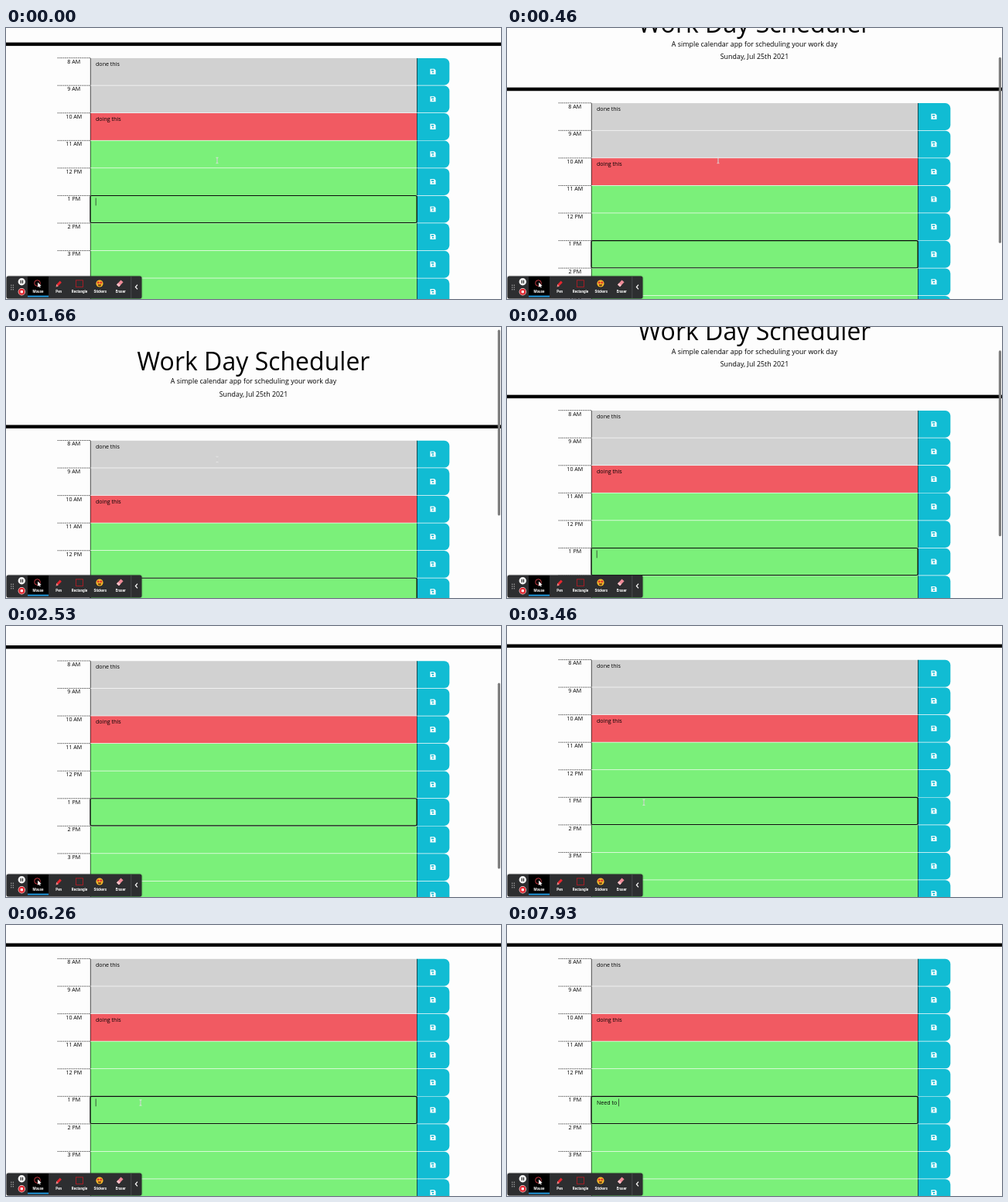
Animation, 640 px wide and 350 px high, one loop 8 s. Source, as an HTML page with a canvas:

```html
<!DOCTYPE html>
<html lang="en">
<head>
<meta charset="utf-8">
<title>Work Day Scheduler</title>
<style>
  html, body { margin: 0; width: 100%; height: 100%; overflow: hidden; background: #fdfdfd; }
  canvas { display: block; width: 640px; height: 350px; }
</style>
</head>
<body>
<canvas id="stage" width="640" height="350"></canvas>
<script>
const ctx = document.getElementById('stage').getContext('2d');
const LOOP = 8000;
const SCALE = 4 / 9;          // page is laid out 1440 px wide
const ROW_TOP = 337, ROW_H = 80, FOCUS = 5;
const LEFT = 150, CELL = 245, SAVE = 1195, RIGHT = 1290;
const HOURS = ['8 AM', '9 AM', '10 AM', '11 AM', '12 PM', '1 PM', '2 PM', '3 PM', '4 PM', '5 PM'];
const NOTES = { 0: 'done this', 2: 'doing this' };
const TYPED = 'Need to ';
const KEYS = [6800, 7000, 7130, 7270, 7400, 7730, 7800, 7930];
const SANS = '"Open Sans", sans-serif';

const clamp = x => Math.min(1, Math.max(0, x));
const span = (t, a, b) => clamp((t - a) / (b - a));
const smooth = x => x * x * (3 - 2 * x);
const mix = (a, b, k) => a + (b - a) * k;

function rect(x, y, w, h, color) {
  ctx.fillStyle = color;
  ctx.fillRect(x, y, w, h);
}

function round(x, y, w, h, r, color) {
  ctx.fillStyle = color;
  ctx.beginPath();
  ctx.roundRect(x, y, w, h, r);
  ctx.fill();
}

function disc(x, y, r, color) {
  ctx.fillStyle = color;
  ctx.beginPath();
  ctx.arc(x, y, r, 0, Math.PI * 2);
  ctx.fill();
}

function poly(points, color) {
  ctx.fillStyle = color;
  ctx.beginPath();
  points.forEach(([x, y]) => ctx.lineTo(x, y));
  ctx.closePath();
  ctx.fill();
}

function line(points, color, width) {
  ctx.strokeStyle = color;
  ctx.lineWidth = width;
  ctx.beginPath();
  points.forEach(([x, y]) => ctx.lineTo(x, y));
  ctx.stroke();
}

function text(str, x, y, font, align = 'left', color = '#000') {
  ctx.font = font;
  ctx.textAlign = align;
  ctx.fillStyle = color;
  ctx.fillText(str, x, y);
}

function scrollAt(t) {
  if (t < 1200) return mix(251, 0, smooth(span(t, 60, 840)));
  return mix(0, 240, smooth(span(t, 1542, 2604)));
}

function drawHeader() {
  text('Work Day Scheduler', 720, 134, `72px ${SANS}`, 'center');
  text('A simple calendar app for scheduling your work day', 720, 173.5, `20px ${SANS}`, 'center');
  text('Sunday, Jul 25th 2021', 720, 210, `20px ${SANS}`, 'center');
  rect(0, 293, 1440, 10, '#000');
}

function saveIcon(x, y, back) {
  poly([[x - 8, y - 8], [x + 4, y - 8], [x + 8, y - 4], [x + 8, y + 8], [x - 8, y + 8]], '#fff');
  rect(x - 5, y - 5.5, 8, 4, back);
  disc(x, y + 3, 2.4, back);
}

function drawRow(i, t) {
  const y = ROW_TOP + i * ROW_H;
  const fill = i < 2 ? '#d1d1d1' : i === 2 ? '#f15a62' : '#7bf07a';
  const teal = '#11bcd3';

  ctx.setLineDash([3.2, 2.2]);
  line([[LEFT, y + 1], [CELL, y + 1]], '#222', 1.8);
  ctx.setLineDash([]);
  text(HOURS[i], 197.5, y + 16.5, `16px ${SANS}`, 'center');

  rect(CELL, y + 1.6, SAVE - CELL, ROW_H - 1.6, fill);
  rect(CELL, y + 1.6, 1.5, ROW_H - 1.6, '#111');
  round(SAVE, y + 1.6, RIGHT - SAVE, ROW_H - 1.6, [0, 15, 15, 0], teal);
  rect(SAVE, y + 1.6, 1.5, ROW_H - 1.6, '#111');
  saveIcon(1242, y + 40.5, teal);
  if (NOTES[i]) text(NOTES[i], 261, y + 24, `16px ${SANS}`);
  if (i === FOCUS) drawInput(y, t);
}

function drawInput(y, t) {
  const typed = TYPED.slice(0, KEYS.filter(k => k <= t).length);
  text(typed, 261, y + 24, `16px ${SANS}`);
  const width = ctx.measureText(typed).width;
  const lit = t >= KEYS[0] || (t + 140) % 1000 < 540;
  if (lit) rect(260.5 + width, y + 8, 1.6, 22, '#222');
}

function drawFocusRing() {
  ctx.strokeStyle = '#0b0b0b';
  ctx.lineWidth = 2.5;
  ctx.beginPath();
  ctx.roundRect(CELL, ROW_TOP + FOCUS * ROW_H + 1, SAVE - CELL, ROW_H - 1, 4);
  ctx.stroke();
}

function drawScrollbar(t, scroll) {
  ctx.globalAlpha = t < 60 ? 0 : 1 - span(t, 3100, 3400);
  round(635.8, 1 + scroll * SCALE * 0.69, 3.2, 240, 1.6, '#7d7d7d');
  ctx.globalAlpha = 1;
}

function drawPointer(t) {
  if ((t > 1900 && t < 2860) || t >= KEYS[0]) return;
  const k = smooth(span(t, 2860, 3530));
  const x = mix(273, 174, k), y = mix(171, 229.5, k);
  ctx.globalAlpha = 0.65;
  line([[x, y - 3.5], [x, y + 3.5]], '#e8e8e8', 1.6);
  line([[x - 1.6, y - 3.7], [x + 1.6, y - 3.7]], '#e8e8e8', 1);
  line([[x - 1.6, y + 3.7], [x + 1.6, y + 3.7]], '#e8e8e8', 1);
  line([[x, y - 2.5], [x, y + 2.5]], '#888', 0.5);
  ctx.globalAlpha = 1;
}

function drawToolbar() {
  ctx.shadowColor = 'rgba(0, 0, 0, 0.4)';
  ctx.shadowBlur = 2;
  round(0.5, 320.5, 175, 29, 2.5, '#2d2e30');
  ctx.shadowBlur = 0;
  for (let i = 0; i < 6; i++) disc(6.8 + (i % 2) * 2.6, 332.2 + (i >> 1) * 2.8, 0.75, '#aaa');

  disc(20.3, 327.8, 4.7, '#f4f4f4');
  rect(18.6, 325.8, 1.2, 4, '#222');
  rect(20.9, 325.8, 1.2, 4, '#222');
  disc(20.3, 340.7, 4.7, '#f4dede');
  disc(20.3, 340.7, 4, '#e0252e');
  rect(18.7, 339.1, 3.2, 3.2, '#fff');

  rect(28, 321, 27, 25, '#000');
  rect(28, 345.6, 27, 1.8, '#1c9ce6');

  // pointer tool
  ctx.strokeStyle = '#e2434c';
  ctx.lineWidth = 0.9;
  ctx.beginPath();
  ctx.arc(40.5, 329.5, 3.8, 0, Math.PI * 2);
  ctx.stroke();
  poly([[41, 328.5], [41, 335], [42.6, 333.6], [43.7, 335.6], [44.7, 335], [43.7, 333.2], [45.7, 332.9]], '#fff');

  // pen
  line([[66.4, 332.2], [70.8, 327.6]], '#e5262f', 3);
  poly([[65.2, 330.8], [67.8, 333.4], [64.6, 334.4]], '#f08a8a');

  ctx.strokeStyle = '#b01c25';
  ctx.lineWidth = 0.9;
  ctx.strokeRect(90.5, 325.8, 9, 8.6);

  // sticker face
  disc(121, 330, 4.6, '#f6bd2b');
  disc(119.2, 328.7, 1.5, '#e0392d');
  disc(122.8, 328.7, 1.5, '#e0392d');
  ctx.fillStyle = '#6b3a12';
  ctx.beginPath();
  ctx.arc(121, 331.2, 2.3, 0, Math.PI);
  ctx.fill();

  // eraser
  poly([[143, 331.5], [148.5, 325.6], [151.6, 328.2], [146, 334.2]], '#ee8b98');
  poly([[143, 331.5], [144.8, 329.6], [147.9, 332.2], [146, 334.2]], '#f7c3c9');

  const labels = { Mouse: 41.5, Pen: 68.2, Rectangle: 95, Stickers: 121.7, Eraser: 148.3 };
  for (const name in labels) text(name, labels[name], 341.7, 'bold 4.5px Roboto, sans-serif', 'center', '#fff');

  rect(161.5, 321, 0.7, 28, '#55575a');
  line([[170, 331.6], [167.4, 334.5], [170, 337.4]], '#fff', 1.2);
}

function draw(t) {
  const scroll = scrollAt(t);
  rect(0, 0, 640, 350, '#fdfdfd');
  ctx.save();
  ctx.scale(SCALE, SCALE);
  ctx.translate(0, -scroll);
  drawHeader();
  HOURS.forEach((_, i) => drawRow(i, t));
  drawFocusRing();
  ctx.restore();
  drawScrollbar(t, scroll);
  drawPointer(t);
  drawToolbar();
}

function tick() {
  draw(performance.now() % LOOP);
  requestAnimationFrame(tick);
}
tick();
</script>
</body>
</html>
```
